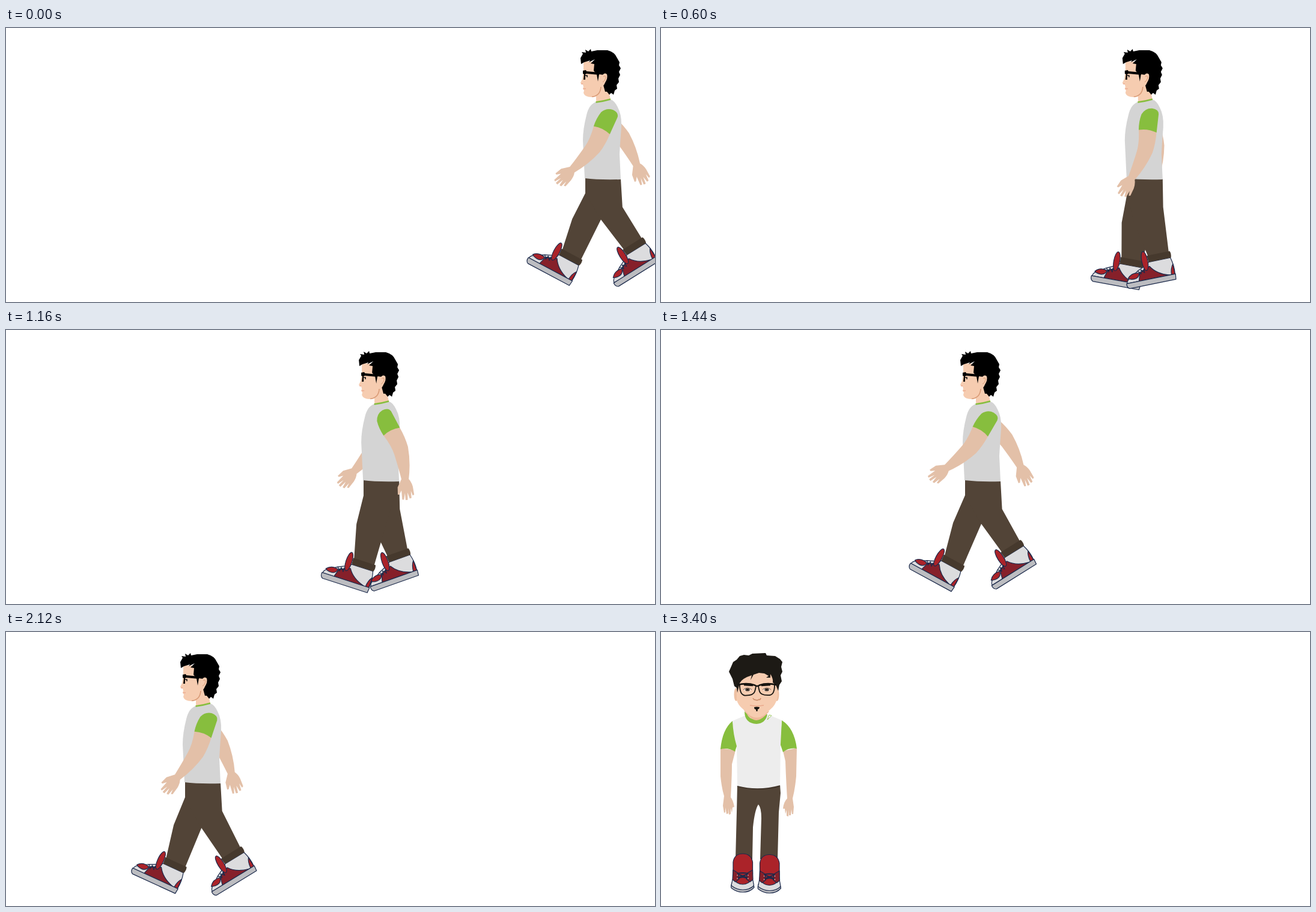
Recreate the animation shown at these times as an HTML page. Size 1080 by 456 pixels, loop 5.2 s.

```html
<!DOCTYPE html>
<html lang="en">
<head>
<meta charset="utf-8">
<title>Walk and blink</title>
<style>
  html, body { margin: 0; width: 100%; height: 100%; overflow: hidden; background: #fff; }
  svg { display: block; width: 100%; height: 100%; }
  .skin { fill: #f6ccb0; }
  .arm { fill: #e3c0a8; }
  .green { fill: #87be3e; }
  .pants { fill: #524437; }
  .cuff { fill: #46392d; }
  .red { fill: #ab2329; }
  .wine { fill: #86202a; }
  .pale { fill: #dcdcde; }
  .sole { fill: #bcbdc1; }
  .ink { stroke: #1c2a4b; stroke-width: 1.2; stroke-linejoin: round; }
  .line { fill: none; }
</style>
</head>
<body>
<svg viewBox="0 0 1080 456">
  <g id="side">
    <g id="farArm"></g>
    <g id="farLeg"></g>
    <g id="nearLeg"></g>
    <path class="skin" d="M5 55V72L3 85 0 91Q1 94 4 94L5 98 4 101 6 104 5 108Q7 115 18 115L26 114V123L50 119 46 100 42 58Z"/>
    <path class="line" stroke="#d99b77" stroke-width="1.6" d="M19 114.5Q33 113 34 98"/>
    <path class="line" stroke="#e79c84" stroke-width="1.2" d="M4.5 101H9M1 93H4"/>
    <path d="M0 50L4 43 2 40 9 41 8 36 13 39 17 35 18 39 28 37H45Q57 40 61 50L65 57 64 62 67 67 64 73 66 78 63 84 64 90 60 95 61 101 57 104 55 111 51 108 48 111 44 106H41L38 95V78L31 77 29 89 27 77 22 71 23 60 17 59 24 52 14 57 16 54 6 57 1 60Z"/>
    <path class="skin" d="M36 79Q40 73 44 77Q46 83 41 91Q38 98 35 97Q32 90 36 79Z"/>
    <path class="line" stroke="#d99b77" d="M38 81Q42 78 42 83Q41 88 37 90"/>
    <path d="M4 71L9 70 10 72 32 74 31 78 10 76 8 77V86H5L6 77 4 76Z"/>
    <path class="line" stroke="#111" stroke-width="1.5" d="M8 79H11V82"/>
    <path fill="#d4d4d4" d="M26 123Q14 127 10 145Q4 168 4 187L7 250Q30 253 67 252L65 210Q66 190 68 165Q69 145 62 132Q57 121 50 119Z"/>
    <path class="line" stroke="#87be3e" stroke-width="2.4" d="M25.5 123.5Q38 122 50 118.5"/>
    <g id="nearArm"></g>
  </g>

  <g id="front">
    <path class="arm" d="M99 193V240Q101 260 105 273L103 289 105 301 107 300V292L109 303 112 302V293L113 304 116 303V293L118 301 119 292 122 291Q120 280 116 275Q118 240 118 220L124 197Z"/>
    <path class="arm" d="M226 193L225 240Q223 262 219 277L221 291 220 303H218L217 295 216 305H213V296L212 307 209 306V296L207 303 206 294 203 294Q204 283 210 277Q208 245 207 215L203 198Z"/>
    <path class="pants" d="M127 254H198L199 268 196 300 194 378H165L167 310Q167 292 162 287Q156 296 153 325L152 378H124L126 300Z"/>
    <path class="line" stroke="#40342a" stroke-width="2" d="M127 256.5Q162 266 198 256.5"/>
    <path class="green" d="M119 148Q102 162 99 195Q112 192 123 199L127 187Z"/>
    <path class="green" d="M201 147Q222 160 226 194Q213 192 203 200L198 185Z"/>
    <path fill="#ededed" d="M119 148L140 139 160 146 180 138 201 147 199 187 198 255Q162 265 127 256L126 190Q120 170 119 148Z"/>
    <path class="skin" d="M141 130L143 140 158 147 171 141 176 130Z"/>
    <path class="green" d="M139 132Q139 152 159 153Q174 152 177 137L172 137Q167 146 158 146Q146 145 143 136Z"/>
    <path fill="#fff" stroke="#87be3e" stroke-width=".8" d="M177 146L180 138 184 139Z"/>
    <ellipse cx="125" cy="104" rx="3.5" ry="11" fill="#eec0a2"/>
    <ellipse cx="193" cy="104" rx="3.5" ry="11" fill="#eec0a2"/>
    <path fill="#efb99a" d="M138 130Q150 147 159 147Q169 146 180 132Z"/>
    <path class="skin" d="M126 80V113Q128 121 135 127L148 139Q159 146 171 139L186 125Q193 117 194 105L195 75 160 60Z"/>
    <path fill="#1d1a15" d="M113 66L117 57 120 50 126 46 131 40 138 38 146 39 152 36 174 35 176 39 190 40 198 45 202 50 200 58 202 66 199 72 201 82 197 88 195 98 191 88 186 84Q187 78 182 70L182 76 175 76 179 73 172 69 163 68 154 71 149 80 151 72Q135 77 131 85L127 101 126 93 122 90 119 78Z"/>
    <g id="eyes"></g>
    <g class="line" stroke="#15130f" stroke-width="1.8">
      <path d="M131 88Q131 104 139 105.5Q154 106 156 99Q158 92 158 89"/>
      <path d="M162 89Q162 92 164 99Q166 106 181 105Q189 104 189 88"/>
      <path stroke-width="2.6" d="M127 88Q143 84 156 88.5Q160 91.5 164 88.5Q177 84 192 88"/>
      <path stroke-width="2.5" d="M138 88L153 89M167 89L182 88"/>
    </g>
    <path class="line" stroke="#c98b69" stroke-width="1.6" d="M153 110Q155 114 157 112M162 112Q165 114 166 110M157 113Q160 114 162 113"/>
    <path class="line" stroke="#eaa98c" stroke-width="1.3" d="M148 122Q159 124 171 122"/>
    <path fill="#15130f" d="M155 125Q159 124 164 125L163 128 161 128.500 160.500 132H158.500L158 129 155.500 128Z"/>
    <g id="shoes"></g>
  </g>
</svg>
<script>
const $ = id => document.getElementById(id);
const LOOP = 5200, STEP = 40, TURN = 2360;

// Arm around its shoulder at 0,0
const limb = `<path class="arm" d="M-14 0L-17.500 19Q-17 40 -22 55Q-30 78 -37 95L-50 102 -57 112 -55 113.500 -48 110 -56 123 -54 125 -46 117 -52 127 -49 129 -42 119 -45 129 -42 130 -36 120 -38 128 -35 128 -29 116Q-26 108 -27 102Q-8 82 4 58Q10 42 12 24L13 0Z"/>`;
const sleeve = `<path class="green" d="M-17.500 19Q-17 5 -12 -7Q-5 -17 6 -16Q17 -14 16.500 -6L12 24.500Q-2 17 -17.500 19Z"/>`;

// Shoe in profile, toe of the sole at 0,0
const shoe = `<g class="ink">
  <path class="pale" d="M1 -9Q2 -15 8 -17L22 -26 40 -34 43 -37H80Q84 -22 82 -9Z"/>
  <path class="wine" d="M21 -9L25 -22 36 -28 43 -30Q52 -15 73 -9Z"/>
  <path class="red" d="M4 -17Q12 -26 24 -22Q22 -14 14 -14Q8 -14 4 -17Z"/>
  <path class="red" d="M82 -9H76Q77 -20 82 -26Z"/>
  <path class="line" d="M22 -26L27 -20 28 -27 33 -21 33 -28M24 -23L35 -26"/>
  <path class="sole" d="M0 -9H83L82 0H4Q-1 -2 0 -9Z"/></g>
  <path class="cuff" d="M42 -48H81Q83 -43 81 -37H43Z"/>
  <ellipse class="red ink" cx="37" cy="-40" rx="5" ry="16"/>`;

const frontShoe = (x, y) => `<g class="ink" transform="translate(${x} ${y})">
  <path class="sole" d="M-18 48Q-20 55 -19 57Q-10 64 0 64Q12 64 19 56L17 47Z"/>
  <path class="pale" d="M-17 43L-19 53Q-10 60 0 60Q12 60 18.500 53L17 44Z"/>
  <path class="red" d="M-16 34V14Q-14 0 0 0Q14 0 16.500 14V34L10 48Q0 54 -10 48Z"/>
  <path class="wine" d="M-16 27L-8 32 -6 42 -12 47 -17 43Z"/>
  <path class="wine" d="M16.500 27L8 32 6 42 12 47 17 43Z"/>
  <path class="line" stroke-width="2" d="M-9 33Q0 31 9 33M-8 40L8 34M8 40L-8 34M-7 41Q0 37 7 41"/>
  <path class="line" style="stroke:#dfe5e8" stroke-dasharray="1.500 4" d="M-9 35V42M9 35V42"/></g>`;

const eye = `<path fill="#fbeee4" d="M-7 0Q0 -6 7 0Q0 5 -7 0Z"/><ellipse rx="3.800" ry="2.600" fill="#4b4038"/>
  <circle r="1.200" fill="#15130f"/><path class="line" stroke="#6d5546" d="M-7 0Q0 -6 7 0"/>`;

$('farArm').innerHTML = limb;
$('nearArm').innerHTML = limb + sleeve;
for (const id of ['farLeg', 'nearLeg']) $(id).innerHTML = `<path class="pants"/><g>${shoe}</g>`;
$('shoes').innerHTML = frontShoe(136, 369) + frontShoe(180.5, 370.5);
$('eyes').innerHTML = `<g>${eye}</g><g>${eye}</g>`;

// near arm angle | far arm x, angle | near foot x, y, angle | far foot x, y, angle
const pose = {
  start: [16, 31, -55, 60, 432, -32, -91, 390, 28],
  back:  [-42, 44, 17, -84.5, 410, 18.5, 33.5, 436, -19.8],
  pass:  [0, 42, -25, -30.5, 433, 0, -20.5, 433, 0],
  cross: [-15, 43, -10, -20.5, 433, 0, -30.5, 433, 0],
  ahead: [22, 36, -56, 57, 433, -32, -87, 396, 28.5],
  far:   [-46, 44, 21, -87, 398, 27, 53, 434, -30],
  late:  [10, 33, -48, 57, 440, -31.4, -83, 401, 24.6],
  slow:  [4, 37, -38, 22, 444, -25, -71, 412, 18]
};
const walk = [
  [0, 'start'], [160, 'pass'], [320, 'back'], [545, 'cross'], [710, 'ahead'],
  [880, 'pass'], [1080, 'far'], [1250, 'cross'], [1440, 'ahead'], [1610, 'pass'],
  [1790, 'far'], [1960, 'cross'], [2120, 'late'], [2240, 'slow'], [2330, 'pass']
].map(([t, name]) => [t, pose[name]]);
const place = [[0, [956]], [320, [857.5]], [880, [677.5]], [1440, [498]], [2120, [290]], [2330, [226]]];

// Smooth curve through timed keys
function sample(keys, t) {
  let i = 0;
  while (i < keys.length - 2 && t >= keys[i + 1][0]) i++;
  const at = k => keys[Math.max(0, Math.min(keys.length - 1, k))];
  const [p, a, b, n] = [at(i - 1), at(i), at(i + 1), at(i + 2)];
  const d = b[0] - a[0], u = Math.min(1, (t - a[0]) / d);
  return a[1].map((v, c) => {
    const w = b[1][c];
    const m = (w - p[1][c]) / (b[0] - p[0]) * d;
    const q = (n[1][c] - v) / (n[0] - a[0]) * d;
    return v + u * (m + u * (3 * (w - v) - 2 * m - q + u * (2 * (v - w) + m + q)));
  });
}

function setArm(id, x, y, angle) {
  $(id).setAttribute('transform', `translate(${x} ${y}) rotate(${angle})`);
}

function setLeg(id, x, y, angle) {
  const [leg, foot] = $(id).children;
  const r = angle * Math.PI / 180, c = Math.cos(r), s = Math.sin(r);
  const turn = (u, v) => [x + u * c - v * s, y + u * s + v * c];
  const [l, rt] = [turn(44, -46), turn(79, -46)];
  const reach = rt[0] - 67;
  const knee = [8 + (l[0] - 8) * .45 - 5 * c, 275 + (l[1] - 275) * .45];
  const pts = [[8, 249], [8, 275], knee, l, turn(44, -40), turn(79, -40), rt,
    [67 + reach * (reach < 0 ? .34 : .08), 298], [67, 251]];
  leg.setAttribute('d', 'M' + pts.map(p => p.map(v => v.toFixed(2)).join(' ')).join('L') + 'Z');
  foot.setAttribute('transform', `translate(${x} ${y}) rotate(${angle})`);
}

const clamp = v => Math.max(0, Math.min(1, v));

function draw(t) {
  const walking = t < TURN;
  $('side').style.display = walking ? '' : 'none';
  $('front').style.display = walking ? 'none' : '';
  if (walking) {
    const p = sample(walk, t);
    $('side').setAttribute('transform', `translate(${sample(place, t)[0]} 0)`);
    setArm('nearArm', 44, 150, p[0]);
    setArm('farArm', p[1], 145, p[2]);
    setLeg('nearLeg', p[3], p[4], p[5]);
    setLeg('farLeg', p[6], p[7], p[8]);
  } else {
    const open = t < 3000 ? 1 - clamp((t - 2600) / 280) : clamp((t - 3160) / 240);
    [...$('eyes').children].forEach((e, i) => {
      e.style.display = open ? '' : 'none';
      e.setAttribute('transform', `translate(${144 + 32 * i} 96) scale(1 ${open})`);
    });
  }
}

const t0 = performance.now();
function tick() {
  const t = Math.max(0, performance.now() - t0) % LOOP;
  draw(Math.floor(t / STEP) * STEP);
  requestAnimationFrame(tick);
}
tick();
</script>
</body>
</html>
```
